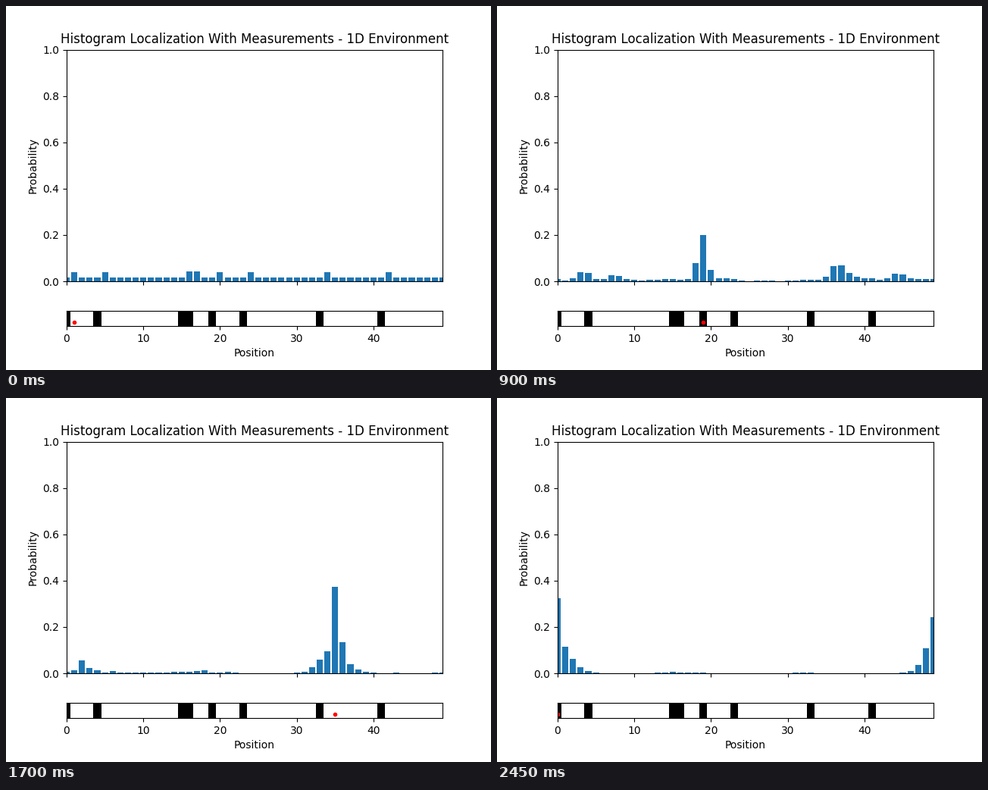
A matplotlib script that plays this animation: 640x480 px, repeating every 2.5 s.

```python
import numpy as np
import matplotlib.pyplot as plt
from matplotlib.animation import FuncAnimation

CELLS = 50
STEPS = 50
P_HIT, P_MISS = 0.6, 0.2
P_EXACT, P_SLIP = 0.8, 0.1

world = np.zeros(CELLS, dtype=int)
world[[0, 4, 15, 16, 19, 23, 33, 41]] = 1


def sense(belief, reading):
    weighted = belief * np.where(world == reading, P_HIT, P_MISS)
    return weighted / weighted.sum()


def move(belief):
    """Shift one cell right on a ring, sometimes falling short or overshooting."""
    return (P_EXACT * np.roll(belief, 1)
            + P_SLIP * belief
            + P_SLIP * np.roll(belief, 2))


def run_filter():
    belief = np.full(CELLS, 1 / CELLS)
    history = []
    for step in range(STEPS):
        belief = move(sense(belief, world[step % CELLS]))
        history.append(belief)
    return history


history = run_filter()

fig, (chart, track) = plt.subplots(
    2, 1, sharex=True, figsize=(6.4, 4.8), dpi=100,
    gridspec_kw={"height_ratios": [10, 1]})

bars = chart.bar(np.arange(CELLS), history[0], color="tab:blue")
chart.set_title("Histogram Localization With Measurements - 1D Environment")
chart.set_ylabel("Probability")
chart.set_ylim(0, 1)

track.imshow(np.tile(world, (2, 1)), cmap="binary", interpolation="nearest")
robot, = track.plot([1], [1], "r.")
track.set_xlabel("Position")
track.set_yticks([])
track.set_ylim(1.5, -0.5)
track.set_xlim(0, CELLS - 1)


def update(step):
    for bar, height in zip(bars, history[step]):
        bar.set_height(height)
    robot.set_data([(step + 1) % CELLS], [1])
    return [*bars, robot]


anim = FuncAnimation(fig, update, frames=STEPS, interval=50, repeat=True)
plt.show()
```
